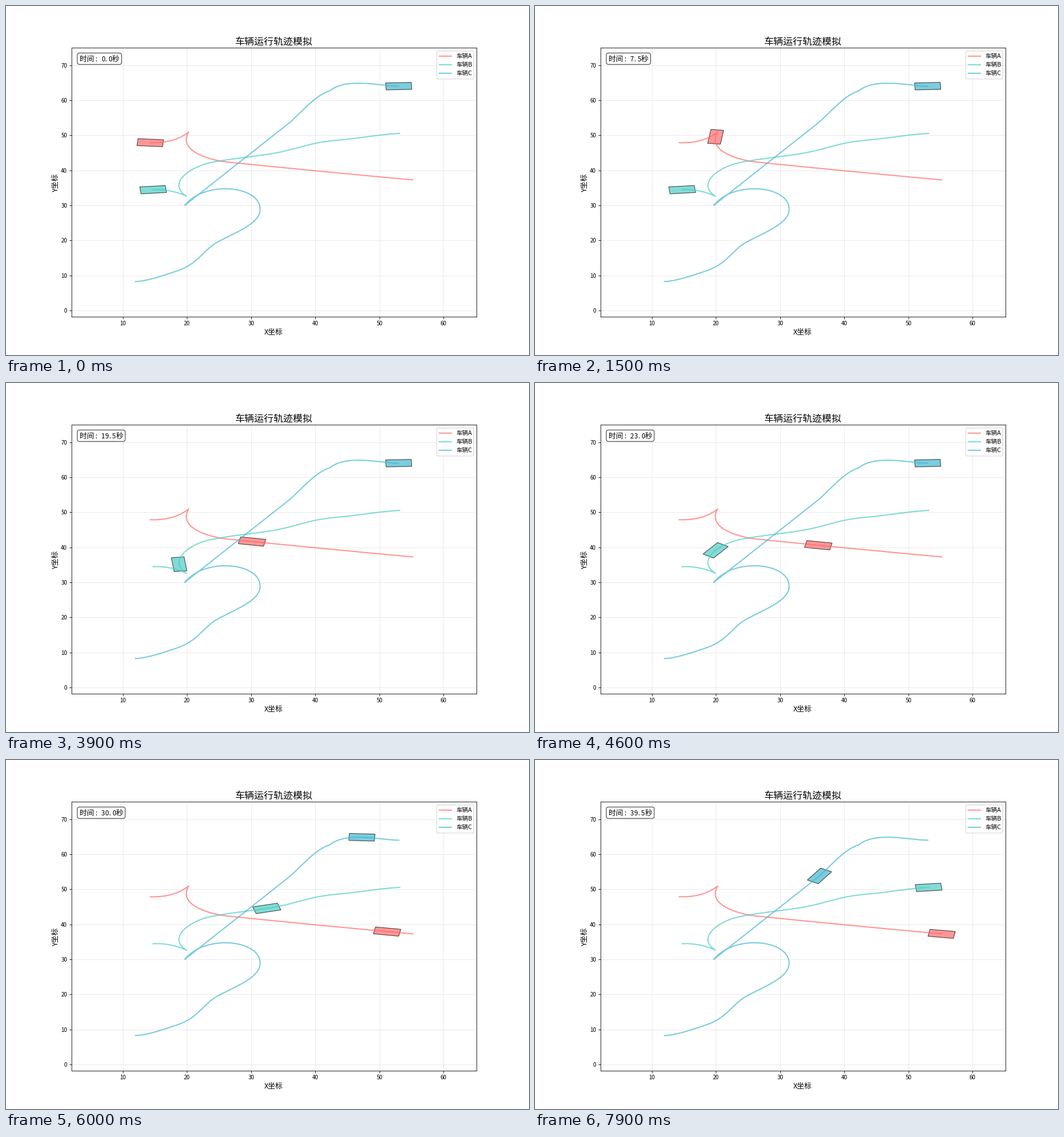
A matplotlib script that plays this animation: 917x611 px, repeating every 8000 ms.

```python
import numpy as np
import matplotlib.pyplot as plt
from matplotlib.animation import FuncAnimation
from matplotlib.lines import Line2D
from matplotlib.patches import FancyBboxPatch, Polygon
from matplotlib.transforms import Affine2D

W, H, DPI = 917, 611, 76.4
FRAMES, INTERVAL, STEP = 80, 100, 0.5
XLIM, YLIM = (1.99, 65.15), (-1.79, 74.98)
EM = 12 * DPI / 72

plt.rcParams["font.family"] = "Noto Sans CJK JP"

# Each road is a chain of cubic Bezier curves in stage pixels.
# A car sets off at `start`, cruises at `speed` and gains `accel` from `boost` on.
CARS = [
    dict(
        name="车辆A", color="#FF6B6B", start=0.4, speed=0.58, boost=32, accel=0.025,
        road=[(253, 239.3), (278, 240.4), (302, 235), (320.3, 220.6),
              (304, 248), (338, 264), (376, 271.7),
              (400, 275), (665, 300.4), (713, 304.4)],
    ),
    dict(
        name="车辆B", color="#4ECDC4", start=22.5, speed=0.51, boost=40, accel=0.0375,
        road=[(258, 321.6), (280, 320.4), (302, 326), (316, 332.8),
              (284, 312), (318, 284.5), (354, 275.3),
              (392, 266.5), (450, 263), (488, 254.2),
              (518, 247), (536, 239.5), (575, 235.5),
              (618, 232), (650, 225.2), (690.2, 223)],
    ),
    dict(
        name="车辆C", color="#45B7D1", start=50, speed=0.58, boost=60, accel=0.031,
        road=[(688.5, 140.3), (660, 141), (598, 124), (567.8, 148.4),
              (541, 157.5), (524, 180.5), (498, 203.6),
              (440, 249.3), (375, 300.5), (313.5, 349),
              (348, 305), (446, 314), (445.5, 356),
              (446, 385), (385, 402), (362, 419),
              (342, 434), (334, 452), (300, 463.8),
              (274, 472.5), (246, 482), (227, 482.4)],
    ),
]

fig = plt.figure(figsize=((W + 0.01) / DPI, (H + 0.01) / DPI), dpi=DPI, facecolor="white")
ax = fig.add_axes([0.125, 0.11, 0.775, 0.77])
ax.set(xlim=XLIM, ylim=YLIM, xticks=range(10, 61, 10), yticks=range(0, 71, 10))
ax.tick_params(labelsize=9.2)
ax.grid(True, alpha=0.3)

# Stage pixels, y downwards
px = Affine2D().scale(1 / W, -1 / H).translate(0, 1) + fig.transFigure


def to_data(pts):
    fx = (pts[:, 0] / W - 0.125) / 0.775
    fy = (0.89 - pts[:, 1] / H) / 0.77
    return np.column_stack([XLIM[0] + fx * np.ptp(XLIM), YLIM[0] + fy * np.ptp(YLIM)])


def bezier(pts, n=200):
    t = np.linspace(0, 1, n)[:, None]
    a, b, c, d = np.array(pts, float)
    return to_data(a * (1 - t) ** 3 + 3 * b * t * (1 - t) ** 2
                   + 3 * c * t * t * (1 - t) + d * t ** 3)


def drive(car):
    """Road in data units plus position and heading for every frame."""
    pts = car["road"]
    legs = [bezier(pts[k:k + 4]) for k in range(0, len(pts) - 1, 3)]
    road = np.vstack(legs)
    head = np.concatenate([np.arctan2(*np.gradient(g, axis=0).T[::-1]) for g in legs])
    arc = np.r_[0, np.cumsum(np.hypot(*np.diff(road, axis=0).T))]

    t = np.arange(FRAMES)
    dist = (car["speed"] * np.maximum(t - car["start"], 0)
            + car["accel"] / 2 * np.maximum(t - car["boost"], 0) ** 2)
    dist = np.minimum(dist, arc[-1])
    pos = np.column_stack([np.interp(dist, arc, c) for c in road.T])
    return road, pos, head[np.searchsorted(arc, dist)]


def body(pos, a, length=4, width=2):
    box = np.array([(-1, -1), (1, -1), (1, 1), (-1, 1)]) * (length / 2, width / 2)
    c, s = np.cos(a), np.sin(a)
    return box @ np.array([[c, s], [-s, c]]) + pos


def label(x, y, s, size, **kw):
    return fig.text(x, y, s, fontsize=size, transform=px, va="baseline", **kw)


def panel(x, y, w, h, r, **kw):
    return fig.add_artist(FancyBboxPatch(
        (x, y), w, h, boxstyle=f"round,pad=0,rounding_size={r}",
        facecolor="white", alpha=0.8, linewidth=1, transform=px, **kw))


label(469.7, 67.4, "车辆运行轨迹模拟", 16, ha="center")
label(469.3, 574.8, "X坐标", 12, ha="center")
label(90.6, 309.5, "Y坐标", 12, ha="center", rotation=90, rotation_mode="anchor")

panel(755.4, 78.8, 64.6, 49, 2.1, edgecolor="0.8")
for k, car in enumerate(CARS):
    car["path"], car["pos"], car["head"] = drive(car)
    style = dict(color=car["color"], lw=2, alpha=0.7)
    ax.plot(*car["path"].T, **style)
    car["patch"] = ax.add_patch(Polygon(
        body(car["pos"][0], car["head"][0]), closed=True, facecolor=car["color"],
        edgecolor="black", alpha=0.7, lw=1))
    y = 87.8 + 15 * k
    fig.add_artist(Line2D([759.7, 780.9], [y, y], transform=px, snap=False, **style))
    label(789.7, y + 3.6, car["name"], 10)

# Clock: half-width cells for the figures
X0, BASE = 128.8, 97.2
clock_box = panel(125, 82.3, 77.6, 20, 3.8, edgecolor="black")
label(X0, BASE, "时间", 12)
unit = label(X0, BASE, "秒", 12)
cells = [label(X0, BASE, "", 11, ha="center") for _ in range(6)]


def update(i):
    for car in CARS:
        car["patch"].set_xy(body(car["pos"][i], car["head"][i]))
    text = f": {i * STEP:.1f}"
    for k, cell in enumerate(cells):
        ch = text[k:k + 1]
        cell.set_text(ch)
        cell.set_x(X0 + EM * (2 + k / 2 + (0.12 if ch == "." else 0.25)))
    end = EM * (2 + len(text) / 2)
    unit.set_x(X0 + end)
    clock_box.set_width(end + EM + 7.6)
    return [car["patch"] for car in CARS] + cells + [unit, clock_box]


anim = FuncAnimation(fig, update, frames=FRAMES, interval=INTERVAL, repeat=True,
                     repeat_delay=0, blit=False)
plt.show()
```
